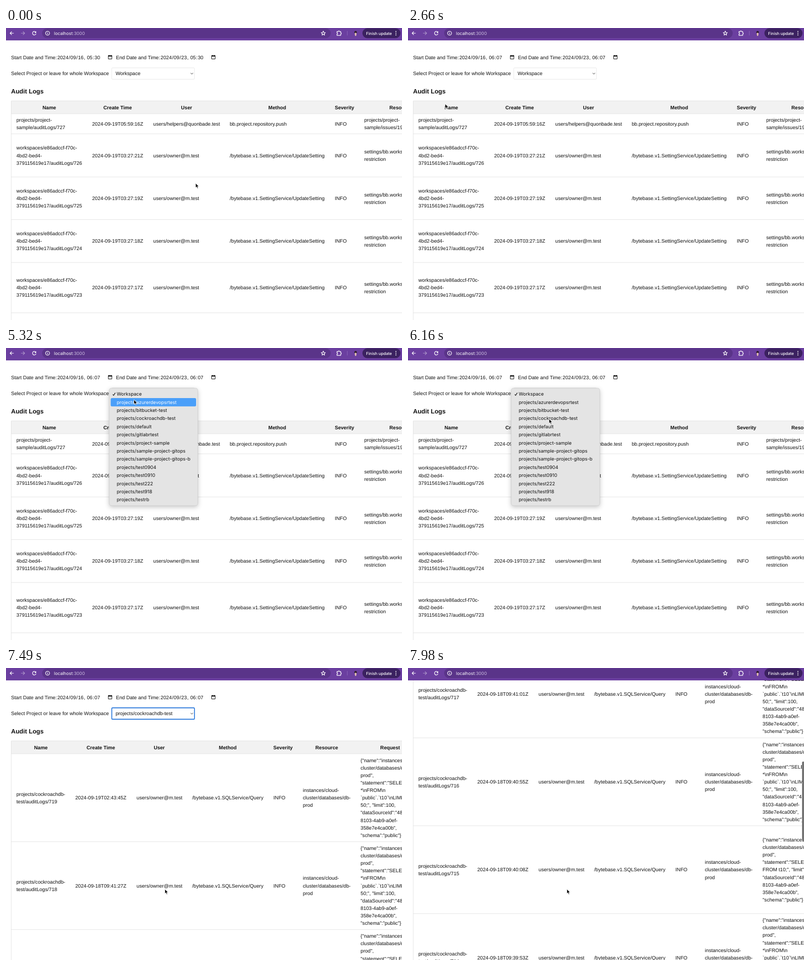
Write an HTML page that moves like this. It is 800 by 589 pixels and loops after 8000 ms.

```html
<!DOCTYPE html>
<html lang="en">
<head>
<meta charset="utf-8">
<title>Audit Logs</title>
<style>
  html, body { margin: 0; width: 100%; height: 100%; overflow: hidden; background: #fff; }
  svg { display: block; width: 800px; height: 589px; }
  text { font: 10.08px "Liberation Sans", Arial, sans-serif; fill: #111; white-space: pre; text-rendering: geometricPrecision; }
  .th { font-weight: bold; text-anchor: middle; }
  .h { font-size: 12.6px; font-weight: bold; }
  .ui { font: 8.8px Inter, sans-serif; fill: #fff; }
  .item { font: 9.45px Inter, sans-serif; }
  .item.on { fill: #fff; }
  .line { stroke: #dfdfdf; stroke-width: .8; }
  .icon { fill: none; stroke: #fff; stroke-width: 1.2; }
  .panel { fill: #e4e4e4; stroke: #c6c6c6; stroke-width: .6; filter: drop-shadow(0 3px 5px rgba(0, 0, 0, .22)); }
</style>
</head>
<body>
<svg viewBox="0 0 800 589">
  <g id="page"></g>
  <rect id="thumb" x="796" width="5" height="160" rx="2" fill="#757575"/>
  <g id="bar">
    <rect width="800" height="25" fill="#6b3fa0"/>
    <rect x="73" y="0.5" width="583" height="20" rx="10" fill="#5a3489"/>
    <rect x="720" y="0.5" width="77" height="20" rx="10" fill="#3b2160"/>
    <path class="icon" d="M15.5 10.5H8.5M11.7 7.1L8.3 10.5L11.7 13.9"/>
    <path class="icon" opacity=".45" d="M30.5 10.5H37.5M34.3 7.1L37.7 10.5L34.3 13.9"/>
    <circle id="hover" cx="57" cy="10.5" r="10" fill="#fff" opacity=".17"/>
    <g id="reload">
      <path class="icon" d="M60 8.3A3.6 3.6 0 1 0 60.6 11.4"/>
      <path fill="#fff" d="M61 6.3V9.9H57.4Z"/>
    </g>
    <path id="stop" class="icon" d="M54 7.5L60 13.5M60 7.5L54 13.5"/>
    <circle class="icon" cx="84" cy="10.5" r="4" stroke-width="1"/>
    <path class="icon" stroke-width="1" d="M84 10V12.8M84 8V9"/>
    <text class="ui" x="97" y="13.7">localhost<tspan fill="#cdbfe0">:3000</tspan></text>
    <path class="icon" stroke-width=".9" stroke-linejoin="round" d="M641 6.2L642.2 9L645.2 9.3L642.9 11.3L643.6 14.3L641 12.7L638.4 14.3L639.1 11.3L636.8 9.3L639.8 9Z"/>
    <path class="icon" stroke-linejoin="round" d="M668.6 7.2H671.2A1.3 1.3 0 0 1 673.8 7.2H676.2V9.6A1.3 1.3 0 0 1 676.2 12.2V14.8H668.6V12.3A1.3 1.3 0 0 0 668.6 9.7Z"/>
    <path stroke="#8a64b8" d="M689.5 6V15"/>
    <circle cx="706.3" cy="8.5" r="2.6" fill="#2c1a2b"/>
    <path fill="#e3bfae" d="M704.6 10.5Q706.3 8.5 708 10.5V13L707.2 16H705.4L704.6 13Z"/>
    <text class="ui" x="727.5" y="13.5" style="font-size:8.1px;font-weight:500">Finish update</text>
    <g fill="#fff"><circle cx="787.7" cy="7" r="1"/><circle cx="787.7" cy="10.5" r="1"/><circle cx="787.7" cy="14" r="1"/></g>
  </g>
  <g id="menu"></g>
  <path id="cursor" d="M0 0V9.2L2.1 7.3L3.6 10.7L5.2 10L3.7 6.8H6.5Z" fill="#000" stroke="#fff" stroke-width=".8"/>
</svg>
<script>
const $ = id => document.getElementById(id);
const LINE = 15.12;

// Text placed by the middle of its line
const text = (x, mid, str, attrs = '') => `<text x="${x}" y="${mid + 3.6}" ${attrs}>${str}</text>`;
const cell = (x, mid, str) => str.split('|')
  .map((s, i, all) => text(x, mid + (i - (all.length - 1) / 2) * LINE, s)).join('');
const rule = y => `<path class="line" d="M10.5 ${y}H800"/>`;

function table(id, heads, xs, rows) {
  let out = `<rect x="10.5" y="147" width="800" height="26" fill="#f2f2f2"/>` + rule(147) + rule(173);
  heads.forEach(([mid, name]) => out += text(mid, 160, name, 'class="th"'));
  let y = 173;
  for (const [height, cells] of rows) {
    cells.forEach((s, i) => out += cell(xs[i], y + height / 2, s));
    y += height;
    out += rule(y);
  }
  return `<g id="${id}">${out}<path class="line" d="M10.5 147V${y + 200}"/></g>`;
}

function dateField(x, label, valueX, day, id) {
  const icon = valueX + 103.3;
  return text(x, 59, label) + text(valueX, 59, '', `id="${id}" data-day="${day}"`) +
    `<path d="M${icon + .5} 56.2h7v6.3h-7z" fill="none" stroke="#111"/>` +
    `<path d="M${icon} 55.2h8v2.4h-8zM${icon + 1.2} 54.4h1.2v1h-1.2zM${icon + 5.6} 54.4h1.2v1h-1.2z" fill="#111"/>`;
}

// Each number in a date input carries a little padding
const padded = s => s.replace(/\d+/g, '<tspan dx=".63">$&</tspan>').replace(/([/,:] ?)/g, (m, c, at, all) =>
  all[at - 1] === '>' ? `<tspan dx=".63">${c}</tspan>` : c);

const admin = 'users/owner@m.test';
const setting = (n, sec, height) => [height, [
  `workspaces/e86adccf-f70c-|4bd2-bed4-|379115619e17/auditLogs/${n}`, `2024-09-19T03:27:${sec}Z`, admin,
  '/bytebase.v1.SettingService/UpdateSetting', 'INFO', 'settings/bb.workspace.|restriction']];

const tail = '"dataSourceId":"48e1|8103-4ab9-a0ef-|358e7e4ca00b",|"schema":"public"}';
const head = '{"name":"instances/cloud-|cluster/databases/db-|prod",|"statement":"SELECT|';
const longQuery = head + '*\\nFROM\\n|`public`.`t10`\\nLIMIT|50;", "limit":100,|' + tail;
const shortQuery = head + 'FROM t10;", "limit":100,|' + tail;
const query = (n, when, request = longQuery) => [177.3, [
  `projects/cockroachdb-|test/auditLogs/${n}`, `2024-09-${when}Z`, admin, '/bytebase.v1.SQLService/Query',
  'INFO', 'instances/cloud-|cluster/databases/db-|prod', request]];

$('page').innerHTML =
  dateField(10.3, 'Start Date and Time:', 103, '2024/09/16', 'start') +
  dateField(222.2, 'End Date and Time:', 311.7, '2024/09/23', 'end') +
  text(10.3, 91.8, 'Select Project or leave for whole Workspace') +
  `<rect id="select" x="213.7" y="80.4" width="167" height="23" rx="1.5" fill="#fff"/>` +
  text(221.4, 91.8, '', 'id="choice"') +
  `<path d="M373 90.6L375.5 93L378 90.6" fill="none" stroke="#333"/>` +
  text(10.3, 128.6, 'Audit Logs', 'class="h"') +
  table('all',
    [[87.5, 'Name'], [225.6, 'Create Time'], [364.8, 'User'], [548, 'Method'], [683.8, 'Severity'], [797.5, 'Resource']],
    [21, 174, 297.6, 452, 664.2, 723.7],
    [
      [40.5, ['projects/project-|sample/auditLogs/727', '2024-09-19T05:59:16Z', 'users/helpers@quonbade.test',
        'bb.project.repository.push', 'INFO', 'projects/project-|sample/issues/190']],
      setting(726, 21, 87), setting(725, 19, 86), setting(724, 18, 86.5), setting(723, 17, 101.5)
    ]) +
  table('project',
    [[70.5, 'Name'], [191.6, 'Create Time'], [309.6, 'User'], [448, 'Method'], [559.6, 'Severity'], [648, 'Resource'], [776, 'Request']],
    [21, 140, 263.8, 376, 540.3, 599.8, 716.3],
    [
      query(719, '19T02:43:45'), query(718, '18T09:41:27'), query(717, '18T09:41:01'),
      query(716, '18T09:40:55'), query(715, '18T09:40:08', shortQuery), query(714, '18T09:39:53')
    ]);

const projects = ['azurerdevopsrtest', 'bitbucket-test', 'cockroachdb-test', 'default', 'gitlabrtest', 'project-sample',
  'sample-project-gitops', 'sample-project-gitops-b', 'test0904', 'test0910', 'test222', 'test918', 'testrb'];
const items = ['Workspace', ...projects.map(p => 'projects/' + p)];
const itemY = i => 92.8 + i * 16.39;
$('menu').innerHTML = '<rect class="panel" x="208.5" y="81" width="179" height="237" rx="4.5"/>' +
  '<rect id="mark" x="211.5" width="172.5" height="16.6" rx="2.5" fill="#4a9ff9"/>' +
  '<path id="tick" d="M215.6 93.6L217.4 95.6L220.8 90.4" fill="none" stroke-width="1.2"/>' +
  items.map((s, i) => text(223.8, itemY(i) - .1, s, 'class="item"')).join('');
const labels = document.querySelectorAll('.item');

// [ms, x, y] stops of the pointer
const pointer = [
  [350, 383, 313], [770, 57, 11], [2310, 57, 11], [2660, 75, 153], [3010, 150, 140], [3640, 252, 99],
  [3990, 253.5, 97], [5180, 253.5, 97], [5740, 285, 143], [6930, 285, 143], [7210, 321, 446]
];
const scroll = [[7630, 0], [7980, 564]];

function at(stops, t) {
  const i = stops.findIndex(s => s[0] > t);
  if (i < 0) return stops[stops.length - 1].slice(1);
  if (i === 0) return stops[0].slice(1);
  const [a, b] = [stops[i - 1], stops[i]];
  const p = (t - a[0]) / (b[0] - a[0]), e = p * p * (3 - 2 * p);
  return a.slice(1).map((v, k) => v + (b[k + 1] - v) * e);
}

const show = (id, on) => $(id).style.display = on ? '' : 'none';
const CLICK = 1680, OPEN = 4200, PICK = 6160, CLOSE = 6300;

function draw(t) {
  const [x, y] = at(pointer, t);
  $('cursor').setAttribute('transform', `translate(${x} ${y})`);
  show('hover', Math.hypot(x - 57, y - 10.5) < 10);

  const loading = t >= CLICK && t < 1960;
  show('stop', loading);
  show('reload', !loading);
  for (const id of ['start', 'end']) {
    const el = $(id);
    el.innerHTML = padded(`${el.dataset.day}, ${t < CLICK ? '05:30' : '06:07'}`);
  }

  const picked = t >= CLOSE;
  $('choice').textContent = items[picked ? 3 : 0];
  $('select').setAttribute('stroke', picked ? '#1a6ed8' : '#e2e2e2');
  $('select').setAttribute('stroke-width', picked ? 1.6 : .8);

  const fade = Math.max(0, Math.min(1, 1 - (t - CLOSE) / 210));
  show('menu', t >= OPEN && fade > 0);
  $('menu').setAttribute('opacity', fade);
  const blink = t >= PICK && t < PICK + 70;
  const active = blink ? -1 : Math.max(0, Math.round((y - 92.8) / 16.39));
  show('mark', active >= 0);
  $('mark').setAttribute('y', itemY(active) + .2 - 8.3);
  $('tick').setAttribute('stroke', active === 0 ? '#fff' : '#111');
  labels.forEach((el, i) => el.classList.toggle('on', i === active));

  show('all', t < 6510);
  show('project', t >= 6510);
  const [top] = at(scroll, t);
  $('page').setAttribute('transform', `translate(0 ${-top})`);
  show('thumb', top > 0);
  $('thumb').setAttribute('y', 27 + top * .287);
}

let last = -1;
function tick(now) {
  const t = Math.floor(now % 8000 / 70) * 70;
  if (t !== last) draw(last = t);
  requestAnimationFrame(tick);
}
tick(performance.now());
</script>
</body>
</html>
```
